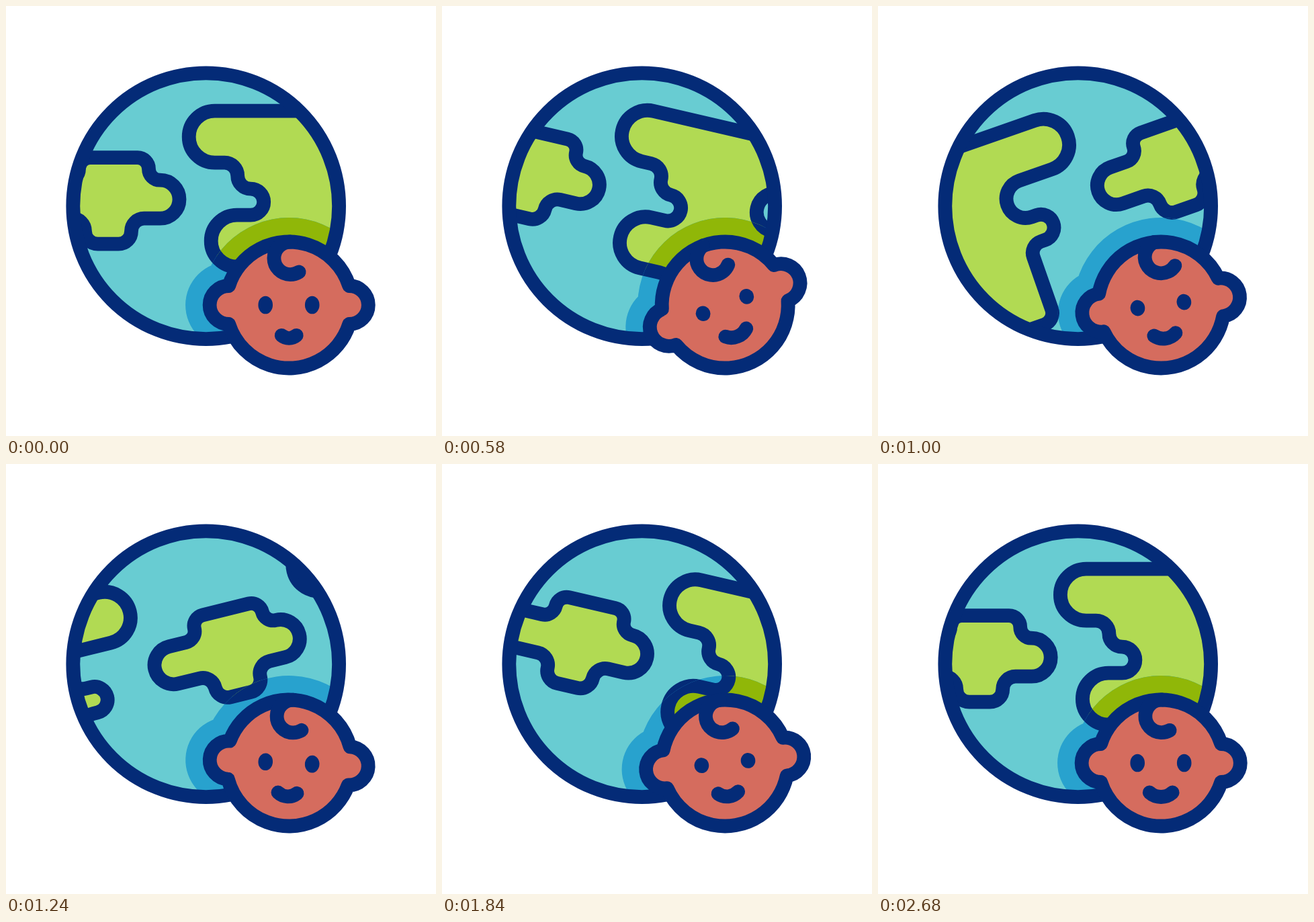
Recreate the animation shown at these times as an HTML page with a canvas. Size 640 px wide and 640 px high, loop 3020 ms.

```html
<!DOCTYPE html>
<html lang="en">
<head>
<meta charset="utf-8">
<title>Globe and baby</title>
<style>
  html, body { margin: 0; height: 100%; overflow: hidden; background: #fff; }
  canvas { display: block; width: 100vw; height: 100vh; }
</style>
</head>
<body>
<canvas width="640" height="640"></canvas>
<script>
  const LOOP = 3020, END = 2680, MAP_WIDTH = 591, EAR = 89.6, { PI } = Math;
  const NAVY = '#042b77', SKIN = '#d56c5e';
  const LIGHT = { sea: '#68ccd2', land: '#b1da53' }, DARK = { sea: '#28a2ce', land: '#90b708' };
  const ctx = document.querySelector('canvas').getContext('2d');

  // Right-angled outline: each step is the x of an upright side and the y where it ends.
  // Short sides become half circles, long ones get small corners.
  function coast(steps) {
    const path = new Path2D(), last = steps.at(-1);
    let y = last[1];
    path.moveTo((last[0] + steps[0][0]) / 2, y);
    steps.forEach(([x, yEnd], i) => {
      const side = Math.abs(yEnd - y), r = side > 80 ? 18 : side / 2;
      path.arcTo(x, y, x, yEnd, r);
      path.arcTo(x, yEnd, steps[(i + 1) % steps.length][0], yEnd, r);
      y = yEnd;
    });
    path.closePath();
    return path;
  }

  function disc(r, x = 0, path = new Path2D()) {
    path.moveTo(x + r, 0);
    path.arc(x, 0, r, 0, 2 * PI);
    return path;
  }

  const island = coast([[65, -38.5], [110.5, 18.5], [39, 56.5], [-30, 18.5], [-110.5, -38.5], [-39, -72]]);
  const mainland = coast([[314.5, -64.5], [196, -7.5], [251.5, 31.5], [207, 150], [106, 90.5],
    [7.5, 13.5], [86, -25.5], [47, -64.5], [-25.5, -141.5]]);
  const land = new Path2D();
  for (const x of [0, MAP_WIDTH]) {
    land.addPath(island, new DOMMatrix().translate(x - 150.2, 0));
    land.addPath(mainland, new DOMMatrix().translate(x, 0));
  }

  const globe = disc(197.9);
  const shade = new Path2D();
  disc(130, 0, shade);
  for (const x of [-EAR, EAR]) disc(64.5, x, shade);

  const face = new Path2D(), join = Math.atan2(28.5, EAR);
  for (const turn of [0, PI]) {
    face.arc(0, 0, 94, turn + PI + join, turn + 2 * PI - join);
    face.arc(EAR * Math.cos(turn), 0, 28.5, turn - PI / 2, turn + PI / 2);
  }
  face.closePath();

  const hair = new Path2D();
  hair.arc(0, 24.3, 24.3, -PI / 2, 1.01, true);

  // Sine-eased value through [time, value] turning points.
  function swing(t, ...keys) {
    const i = Math.max(1, keys.findIndex(k => k[0] >= t));
    const [t0, a] = keys[i - 1], [t1, b] = keys[i];
    return a + (b - a) * (1 - Math.cos(PI * (t - t0) / (t1 - t0))) / 2;
  }

  // cubic-bezier(x1, 0, x2, 1), solved by bisection
  function ease(u, x1, x2) {
    u = Math.min(1, Math.max(0, u));
    let s = .5;
    for (let step = .25; step > 1e-6; step /= 2) {
      const x = 3 * s * (1 - s) ** 2 * x1 + 3 * s * s * (1 - s) * x2 + s ** 3;
      s += x < u ? step : -step;
    }
    return s * s * (3 - 2 * s);
  }

  function at(x, y, degrees, paint) {
    ctx.save();
    ctx.translate(x, y);
    ctx.rotate(degrees * PI / 180);
    paint();
    ctx.restore();
  }

  function drawMap(t, colors) {
    const tilt = swing(t, [0, 0], [480, 16.3], [1000, -19.3], [1900, 13.4], [END, 0]);
    at(297.7, 297.7, tilt, () => {
      ctx.fillStyle = colors.sea;
      ctx.fill(globe);
      ctx.clip(globe);
      ctx.translate(-(MAP_WIDTH + .8) * ease((t - 421) / 2207, .21, .16), 0);
      ctx.fillStyle = colors.land;
      ctx.fill(land);
      ctx.stroke(land);
    });
  }

  function drawHead(t) {
    ctx.fillStyle = SKIN;
    ctx.fill(face);
    ctx.stroke(face);
    const curl = swing(t, [0, 0], [880, -20.5], [1540, 12], [1900, -3], [END, 2.5]);
    at(2, -94, curl, () => ctx.stroke(hair));

    ctx.fillStyle = NAVY;
    const eye = 13.3 - 2 * Math.abs(Math.sin(2 * PI * t / END));
    for (const x of [-35, 34.5]) {
      ctx.beginPath();
      ctx.ellipse(x, 0, 10.8, eye, 0, 0, 2 * PI);
      ctx.fill();
    }

    const smile = Math.abs(Math.sin(PI * Math.min(t, 2250) / 1500));
    const half = 11 + 6 * smile, sag = 4 + 2.5 * smile;
    const r = (half * half + sag * sag) / (2 * sag), a = Math.asin(half / r);
    ctx.beginPath();
    ctx.arc(0, 45.3 - 1.3 * smile + sag - r, r, PI / 2 - a, PI / 2 + a);
    ctx.stroke();
  }

  function draw(now) {
    const t = Math.min(now % LOOP, END);
    const nod = swing(t, [0, 0], [560, -21.5], [1420, 5.6], [1840, -6], [2220, 3], [END, 0]);
    const atHead = paint => at(421.2, 445, nod, paint);

    ctx.clearRect(0, 0, 640, 640);
    ctx.strokeStyle = NAVY;
    ctx.lineWidth = 20.8;
    ctx.lineCap = ctx.lineJoin = 'round';

    drawMap(t, LIGHT);
    ctx.save();
    atHead(() => shadeClip = ctx.getTransform());
    const shadow = new Path2D();
    shadow.addPath(shade, shadeClip);
    ctx.clip(shadow);
    drawMap(t, DARK);
    ctx.restore();

    at(297.7, 297.7, 0, () => ctx.stroke(globe));
    atHead(() => drawHead(t));
    requestAnimationFrame(draw);
  }

  let shadeClip;
  requestAnimationFrame(draw);
</script>
</body>
</html>
```
